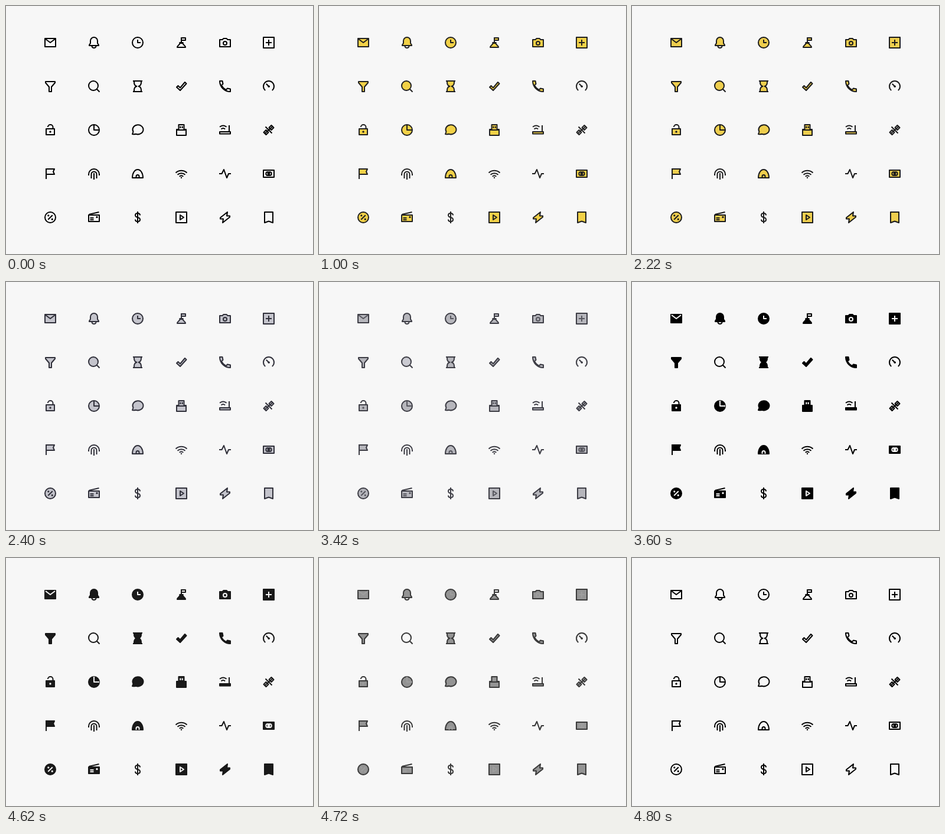
Recreate the animation shown at these times as an HTML page. Size 520 px wide and 420 px high, loop 4820 ms.

```html
<!DOCTYPE html>
<html lang="en">
<head>
<meta charset="utf-8">
<title>Icon styles</title>
<style>
  html, body { margin: 0; width: 100%; height: 100%; overflow: hidden; background: #f7f7f7; }
  svg { display: block; width: 520px; height: 420px; }
  path { fill: none; stroke: var(--ink); stroke-width: 2; stroke-linejoin: round; }
  .body { fill: var(--body); }
  .tint { fill: var(--tint); }
  .mark { stroke: var(--mark); }
  .dot { fill: var(--mark); stroke: none; }
  .inkdot { fill: var(--ink); stroke: none; }
</style>
</head>
<body>
<svg id="stage" viewBox="0 0 520 420"></svg>
<script>
const circle = (x, y, r) => `M${x - r} ${y}a${r} ${r} 0 1 1 ${2 * r} 0a${r} ${r} 0 1 1 ${-2 * r} 0z`;
const square = 'M3 3h18v18H3z';
const disc = circle(12, 12, 9);

// Each icon sits in a 24 unit box; layers are painted in key order.
const icons = [
  { body: 'M3 5h18v14H3z', mark: 'M4 6l8 6 8-6' },
  { line: 'M8.5 18a3.5 3 0 0 0 7 0', body: 'M12 3a6 6 0 0 0-6 6v4l-2 3v1h16v-1l-2-3V9a6 6 0 0 0-6-6z' },
  { body: disc, mark: 'M12 7v5h5' },
  { tint: 'M12 4h7v4h-7z', line: 'M12 3v9M8.5 12h7', body: 'M9.5 13c0 3-4.5 3.5-4.5 7h14c0-3.5-4.5-4-4.5-7z' },
  { body: 'M3 7h4.5l2-2h5l2 2H21v12H3z', mark: circle(12, 13, 3) },
  { body: square, mark: 'M12 7v10M7 12h10' },

  { body: 'M4 4h16v2l-6 7v8h-4v-8L4 6z' },
  { tint: circle(11, 11, 8), line: 'M16.8 16.8l4.7 4.7' },
  { body: 'M6 3v2a6 7 0 0 0 4.5 7 6 7 0 0 0-4.5 7v2h12v-2a6 7 0 0 0-4.5-7 6 7 0 0 0 4.5-7V3z', line: 'M4 3h16M4 21h16' },
  { body: 'M4 13.5l2.5-2.5 3.5 3.5L18 5l2.5 2.5L10 19z' },
  { body: 'M3 3h4.5l1 5-2.6 2.2a18 18 0 0 0 7.9 7.9l2.2-2.6 5 1V21C11 21 3 13 3 3z' },
  { line: 'M6.2 18.9A9 9 0 1 1 17.8 18.9M7.7 7.7l4.6 4.6', inkdot: circle(12.2, 12.2, 1.8) },

  { body: 'M5 10h14v10H5z', line: 'M16.5 10V7a4.3 4 0 0 0-8.6 0', dot: circle(12, 15, 1.7) },
  { body: disc, mark: 'M12 3v9h9' },
  { body: 'M3 19l1.5-4A9 8 0 1 1 9 18.7Q6 19.5 3 19z' },
  { body: 'M7.5 3h9v8H20v10H4V11h3.5z', line: 'M4 12h16', mark: 'M10.3 5.5v3.5M13.7 5.5v3.5' },
  { body: 'M3 15h18v3.5H3z', line: 'M19 15V4M3 6.8q5.8-4.6 11.5 0M5.5 10.5q3.3-2.9 6.6 0' },
  { line: 'M12.5 8l4-4L20.5 8l-4 4zM3.5 16l4-4 4 4-4 4zM6.5 6.5l11 11M10 14l4-4M14.5 10l4-4M5.5 18l4-4' },

  { body: 'M5 4h14l-2 4.5 2 4.5H5z', line: 'M5 21V3' },
  { line: 'M3 15v-2a9 9 0 0 1 18 0v2M7.5 20v-7a4.5 4.5 0 0 1 9 0v7M12 11v11' },
  { body: 'M3 19C3 11 7 5 12 5s9 6 9 14z', mark: 'M9.5 19v-2.5a2.5 2.5 0 0 1 5 0V19' },
  { line: 'M2.5 10.5a14 14 0 0 1 19 0M5.5 13.7a9.6 9.6 0 0 1 13 0M8.7 16.7a5 5 0 0 1 6.6 0', inkdot: circle(12, 18.7, 1.2) },
  { line: 'M2 12h4.5L10 5l5 14 3-7h4' },
  { body: 'M3 6h18v12H3z', mark: circle(10.3, 12, 3) + circle(13.7, 12, 3) },

  { body: disc, mark: 'M15.8 8.2l-7.6 7.6', dot: circle(8.8, 8.8, 1.6) + circle(15.2, 15.2, 1.6) },
  { body: 'M3 8h18v11H3z', line: 'M3.5 7L20.5 3', mark: 'M5.5 13h6M5.5 16h6', dot: circle(17, 11.5, 1.7) },
  { line: 'M12 2v20M16 8.5C16 6 14 5 12 5S8 6 8 8.3s2 3.2 4 3.7 4 1.3 4 3.7-2 3.3-4 3.3-4-1-4-3.5' },
  { body: square, mark: 'M10 8l6 4-6 4z' },
  { body: 'M16 3L4 12.5v2h5L8 21l12-9.5v-2h-5z' },
  { body: 'M5 3h14v18l-7-2.5L5 21z' }
];

const styles = [
  { ink: '#000', body: 'none', tint: 'none', mark: '#000' },
  { ink: '#000', body: '#f2cb2c', tint: '#f2cb2c', mark: '#000' },
  { ink: '#30303a', body: '#c4c4cc', tint: '#c4c4cc', mark: '#30303a' },
  { ink: '#000', body: '#000', tint: 'none', mark: '#f7f7f7' }
];

const drawIcon = (icon, i) => {
  const x = 63 + 74 * (i % 6), y = 50 + 74 * Math.floor(i / 6);
  const paths = Object.entries(icon).map(([kind, d]) => `<path class="${kind}" d="${d}"/>`);
  return `<g transform="translate(${x} ${y})">${paths.join('')}</g>`;
};
const artwork = icons.map(drawIcon).join('');
const stage = document.getElementById('stage');
stage.innerHTML = styles.map(style => {
  const vars = Object.entries(style).map(([name, color]) => `--${name}:${color}`).join(';');
  return `<g style="${vars}">${artwork}</g>`;
}).join('');
const layers = [...stage.children];

const LOOP = 4820, STEP = 20, STEPS = 10;
const starts = [1000, 2220, 3420, 4620];

function draw(time) {
  const t = time % LOOP;
  const opacity = [0, 0, 0, 0];
  const active = starts.filter(start => t >= start).length;
  if (!active) {
    opacity[0] = 1;
  } else {
    const step = Math.floor((t - starts[active - 1]) / STEP) + 1;
    const p = Math.min(step / STEPS, 1);
    const next = active % 4;
    if (next === 1) {
      // The coloured set cuts in and then settles to full strength.
      opacity[1] = 0.856 + 0.144 * p;
    } else {
      opacity[active - 1] = 1 - p;
      opacity[next] = p;
    }
  }
  layers.forEach((layer, i) => {
    layer.style.opacity = opacity[i];
    layer.style.display = opacity[i] ? '' : 'none';
  });
}

function tick() {
  draw(performance.now());
  requestAnimationFrame(tick);
}
tick();
</script>
</body>
</html>
```
